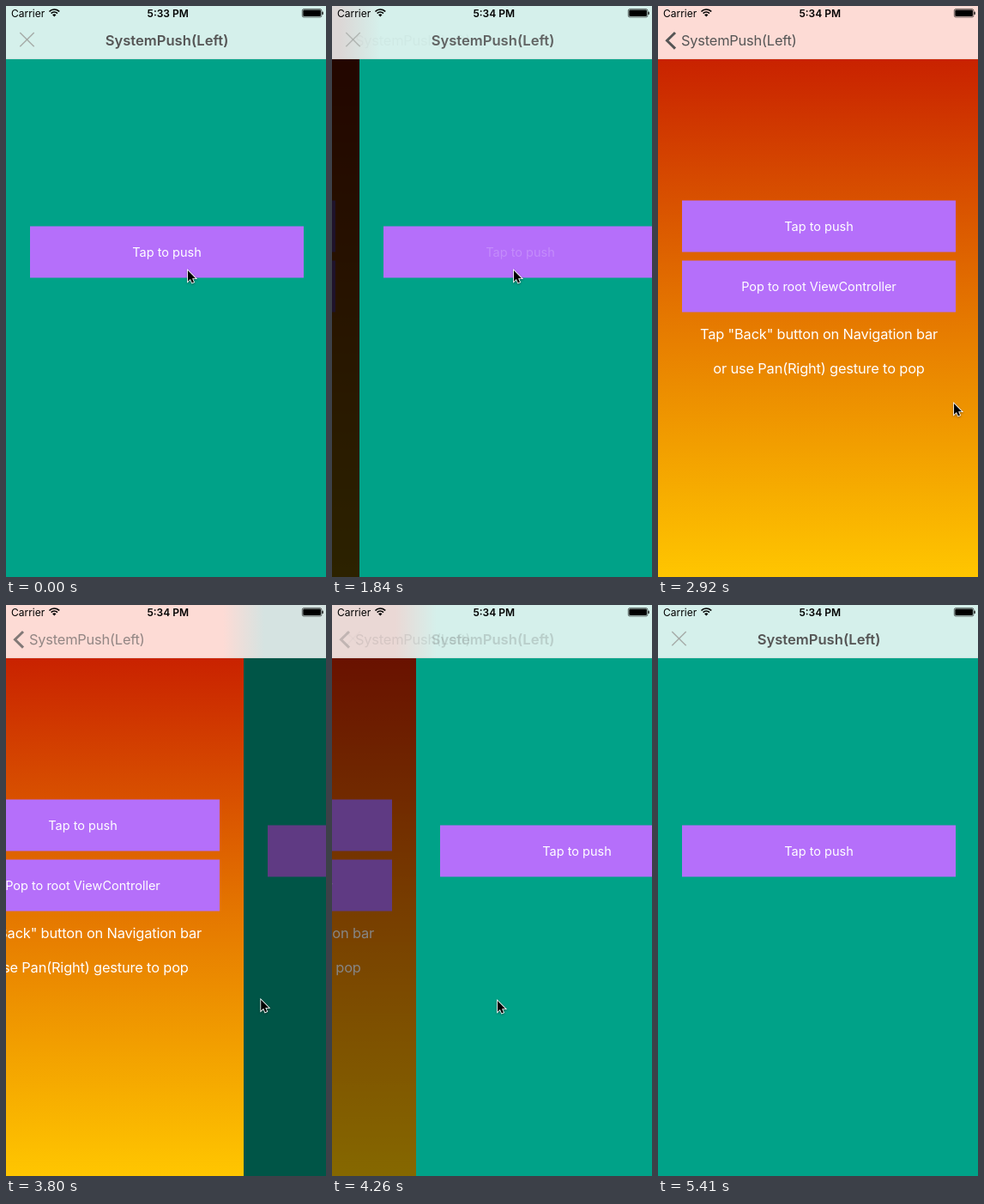
These frames come from a looping animation (373 by 665 pixels, 6.49 s). An HTML page with a canvas:

```html
<!DOCTYPE html>
<html lang="en">
<head>
<meta charset="utf-8">
<title>Push and pan transition</title>
<style>
  html, body { margin: 0; width: 373px; height: 665px; overflow: hidden; }
  canvas { display: block; }
</style>
</head>
<body>
<canvas id="stage" width="373" height="665"></canvas>
<script>
const ctx = document.getElementById('stage').getContext('2d');
const LOOP = 6490, W = 375, H = 665, BAR = 62, MID = W / 2;
const PURPLE = '#b56ffa', TEAL = [0, 162, 136], RED = [240, 34, 0];

// Pointer path: time, x, y
const PATH = [
  [0, 212, 308], [2460, 212, 308], [2560, 226, 324], [2800, 325, 441],
  [2920, 345, 463], [3090, 352, 462], [3200, 352, 462], [3260, 354, 461],
  [3520, 354, 461], [4000, 257, 459], [4240, 193, 461], [4860, 193, 461],
  [5050, 225, 505], [5250, 275, 590], [5410, 314, 668], [LOOP, 314, 668]
];

const clamp = (v, lo = 0, hi = 1) => Math.min(hi, Math.max(lo, v));
const rgb = c => `rgb(${c.map(Math.round)})`;

function pointerAt(t) {
  const i = PATH.findIndex(key => key[0] > t);
  const [t0, x0, y0] = PATH[i - 1], [t1, x1, y1] = PATH[i];
  const k = (t - t0) / (t1 - t0);
  return [x0 + (x1 - x0) * k, y0 + (y1 - y0) * k];
}

// Symmetric cubic-bezier(.42, 0, .58, 1)
function easeInOut(x) {
  let lo = 0, hi = 1, s = 0.5;
  for (let i = 0; i < 16; i++) {
    s = (lo + hi) / 2;
    const bx = 3 * (1 - s) ** 2 * s * 0.42 + 3 * (1 - s) * s * s * 0.58 + s ** 3;
    if (bx < x) lo = s; else hi = s;
  }
  return s * s * (3 - 2 * s);
}

// x of the seam between the orange page (left) and the teal page (right)
function seamAt(t) {
  if (t < 1840) return 0;
  if (t < 3520) return W * easeInOut(clamp((t - 1701) / 688));
  if (t < 4260) return W - 1.72 * (354 - pointerAt(t)[0]);
  return 98 * (1 - clamp((t - 4260) / 480)) ** 2;
}

function text(str, x, y, size, { color = '#fff', weight = 400, align = 'center', alpha = 1, tracking = 0 } = {}) {
  ctx.save();
  ctx.globalAlpha *= clamp(alpha);
  ctx.font = `${weight} ${size}px Inter, Roboto, sans-serif`;
  ctx.letterSpacing = `${size * tracking}px`;
  ctx.textAlign = align;
  ctx.fillStyle = color;
  ctx.fillText(str, x, y + size * 0.364);
  ctx.restore();
}

function line(points, width, color, alpha = 1) {
  ctx.save();
  ctx.globalAlpha = clamp(alpha);
  ctx.lineWidth = width;
  ctx.strokeStyle = color;
  ctx.beginPath();
  points.forEach(([x, y], i) => i ? ctx.lineTo(x, y) : ctx.moveTo(x, y));
  ctx.stroke();
  ctx.restore();
}

function button(label, y, alpha = 1) {
  ctx.fillStyle = PURPLE;
  ctx.fillRect(28, y, 319, 60);
  text(label, MID, y + 30.3, 14.5, { alpha });
}

function page(x, light, fill, content) {
  ctx.save();
  ctx.translate(x, 0);
  ctx.fillStyle = fill;
  ctx.fillRect(0, 0, W, H);
  content();
  ctx.fillStyle = `rgba(0,0,0,${1 - light})`;
  ctx.fillRect(0, 0, W, H);
  ctx.restore();
}

function orangeFill() {
  const g = ctx.createLinearGradient(0, BAR, 0, H);
  g.addColorStop(0, '#c92200');
  g.addColorStop(0.5, '#e57800');
  g.addColorStop(1, '#ffc600');
  return g;
}

function navBar(seam, orangeLight, tealLight, popping) {
  const frost = (c, light) => rgb(c.map(v => 213 + v * light * 0.165));
  const left = frost(RED, orangeLight), right = frost(TEAL, tealLight);
  if (seam <= 0 || seam >= W) {
    ctx.fillStyle = seam <= 0 ? right : left;
  } else {
    const g = ctx.createLinearGradient(seam - 24, 0, seam + 24, 0);
    g.addColorStop(0, left);
    g.addColorStop(1, right);
    ctx.fillStyle = g;
  }
  ctx.fillRect(0, 0, W, BAR);
  ctx.fillStyle = 'rgba(0,0,0,.12)';
  ctx.fillRect(0, BAR - 0.5, W, 0.5);

  const q = seam / W;
  const ink = '#555', name = 'SystemPush(Left)';
  text(name, MID, 40, 16.6, { color: ink, weight: 600, alpha: popping ? (1 - q) ** 5 : 1 - q });
  text(name, 27, 40, 16.4, { color: ink, align: 'left', tracking: -0.012, alpha: q ** (popping ? 1.5 : 1.3) });
  line([[20, 31], [10.5, 40.3], [20, 49.6]], 3, ink, popping ? q : q ** 10);
  const crossAlpha = 0.9 * (1 - q) ** (popping ? 8 : 3);
  line([[16.3, 31], [32.7, 47.2]], 1.4, '#a0a3a0', crossAlpha);
  line([[32.7, 31], [16.3, 47.2]], 1.4, '#a0a3a0', crossAlpha);
}

function statusBar(t) {
  text('Carrier', 6, 8.2, 12, { color: '#000', align: 'left' });
  text(t < 50 ? '5:33 PM' : '5:34 PM', 188.7, 8.2, 12, { color: '#000', weight: 600 });

  ctx.strokeStyle = ctx.fillStyle = '#000';
  ctx.lineWidth = 1.7;
  for (const r of [8, 5]) {
    ctx.beginPath();
    ctx.arc(56.3, 12, r, -Math.PI * 0.76, -Math.PI * 0.24);
    ctx.stroke();
  }
  ctx.beginPath();
  ctx.moveTo(56.3, 12.4);
  ctx.arc(56.3, 12.4, 3, -Math.PI * 0.76, -Math.PI * 0.24);
  ctx.fill();

  ctx.lineWidth = 0.6;
  ctx.beginPath();
  ctx.roundRect(345.3, 3.6, 22.6, 9.4, 1.8);
  ctx.stroke();
  ctx.beginPath();
  ctx.roundRect(346.3, 4.6, 20.6, 7.4, 1);
  ctx.roundRect(368.4, 6.6, 1.3, 3.4, 0.6);
  ctx.fill();
}

function pointer(x, y) {
  ctx.save();
  ctx.translate(x, y);
  ctx.scale(0.84, 0.84);
  const arrow = new Path2D('M0 0V15.2L3.5 11.9L5.8 17.2L8.3 16.1L6 10.9H10.8Z');
  ctx.shadowColor = 'rgba(0,0,0,.4)';
  ctx.shadowBlur = 2.5;
  ctx.shadowOffsetY = 1;
  ctx.strokeStyle = '#fff';
  ctx.lineWidth = 2;
  ctx.stroke(arrow);
  ctx.shadowColor = 'transparent';
  ctx.fillStyle = '#000';
  ctx.fill(arrow);
  ctx.restore();
}

function draw(t) {
  const seam = Math.round(seamAt(t));
  const orangeLight = clamp(seam / MID), tealLight = clamp((W - seam) / MID);
  const pressed = t >= 1840 && t < 2430;
  const labelAlpha = pressed ? clamp(0.2 + (t - 1840) / 590) : 1;

  page(seam, tealLight, rgb(TEAL), () => button('Tap to push', 256.5, labelAlpha));
  page(seam - W, orangeLight, orangeFill(), () => {
    button('Tap to push', 226.5);
    button('Pop to root ViewController', 296.5);
    text('Tap "Back" button on Navigation bar', MID, 382, 16.4, { tracking: -0.01 });
    text('or use Pan(Right) gesture to pop', MID, 422, 16.4, { tracking: -0.01 });
  });
  navBar(seam, orangeLight, tealLight, t >= 3520);
  statusBar(t);
  pointer(...pointerAt(t));
}

const start = performance.now();
function tick() {
  draw((performance.now() - start) % LOOP);
  requestAnimationFrame(tick);
}
tick();
</script>
</body>
</html>
```
